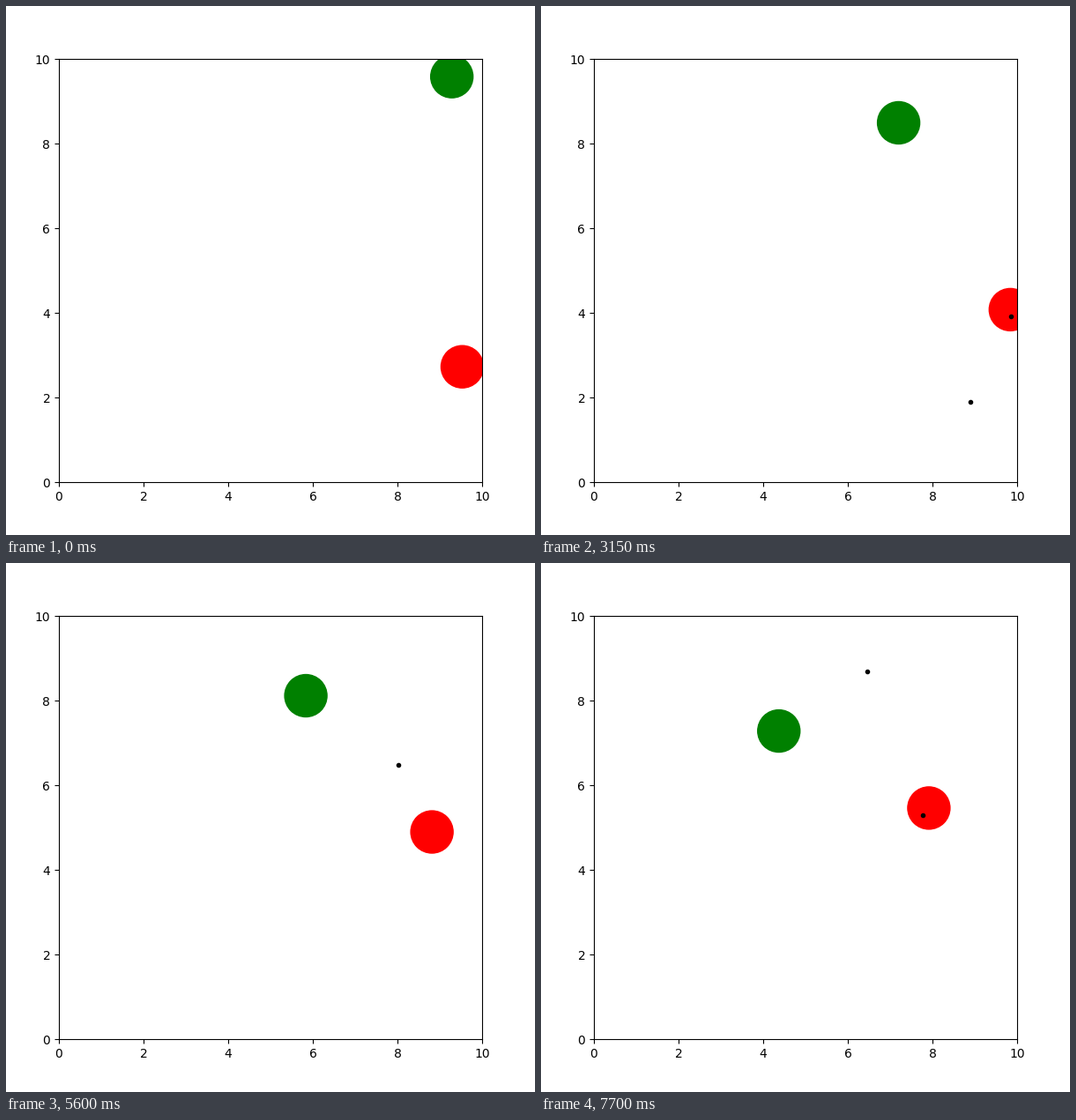
A matplotlib script that plays this animation: 600x600 px, repeating every 8000 ms.

```python
import numpy as np
import matplotlib.pyplot as plt
from matplotlib.animation import FuncAnimation

STEPS = 23
HOLD = 7            # ticks of 50 ms per simulation step
TICKS = 160
SIZE = 10
SHOT_SPEED = 0.45
SHOT_EVERY = 4
HEADINGS = np.radians([263.6, 232.2, 125.5, 36.8, 31.3, 185.3])

# Turning points of each walk: step, x, y
GREEN_TURNS = [(0, 9.285, 9.58), (2, 8.785, 9.225), (5, 8.035, 8.845),
               (9, 7.2, 8.49), (11, 6.71, 8.54), (13, 6.225, 8.72),
               (15, 6.08, 8.31), (20, 4.855, 7.33), (22, 4.37, 7.28)]
RED_TURNS = [(0, 9.53, 2.725), (4, 10.13, 3.325), (5, 9.865, 3.475),
             (9, 9.84, 4.075), (13, 9.265, 4.675), (16, 8.815, 4.895),
             (17, 8.665, 4.91), (20, 8.215, 5.33), (22, 7.915, 5.46)]


def walk(turns, step):
    """Position on a path of straight legs, kept inside the box."""
    when, x, y = zip(*turns)
    pos = np.interp(step, when, x), np.interp(step, when, y)
    return np.minimum(pos, SIZE)


def fly(index, step):
    """Position of a shot, or nothing before it is fired."""
    fired = SHOT_EVERY * index
    age = step - fired - 1
    if age < 0:
        return [], []
    angle = HEADINGS[index]
    x, y = walk(RED_TURNS, fired)
    dist = SHOT_SPEED * age
    return [x + dist * np.cos(angle)], [y + dist * np.sin(angle)]


fig = plt.figure(figsize=(6, 6), dpi=100)
ax = fig.add_axes([0.1, 0.1, 0.8, 0.8])
ax.set_xlim(0, SIZE)
ax.set_ylim(0, SIZE)

green, red = [ax.add_patch(plt.Circle((0, 0), 0.5, color=c))
              for c in ("green", "red")]
shots = [ax.plot([], [], "ko", markersize=3)[0] for _ in HEADINGS]


def update(tick):
    step = min(tick // HOLD, STEPS - 1)
    green.center = walk(GREEN_TURNS, step)
    red.center = walk(RED_TURNS, step)
    for i, shot in enumerate(shots):
        shot.set_data(*fly(i, step))
    return [green, red, *shots]


anim = FuncAnimation(fig, update, frames=TICKS, interval=50,
                     repeat=True, repeat_delay=0, blit=False)
plt.show()
```
